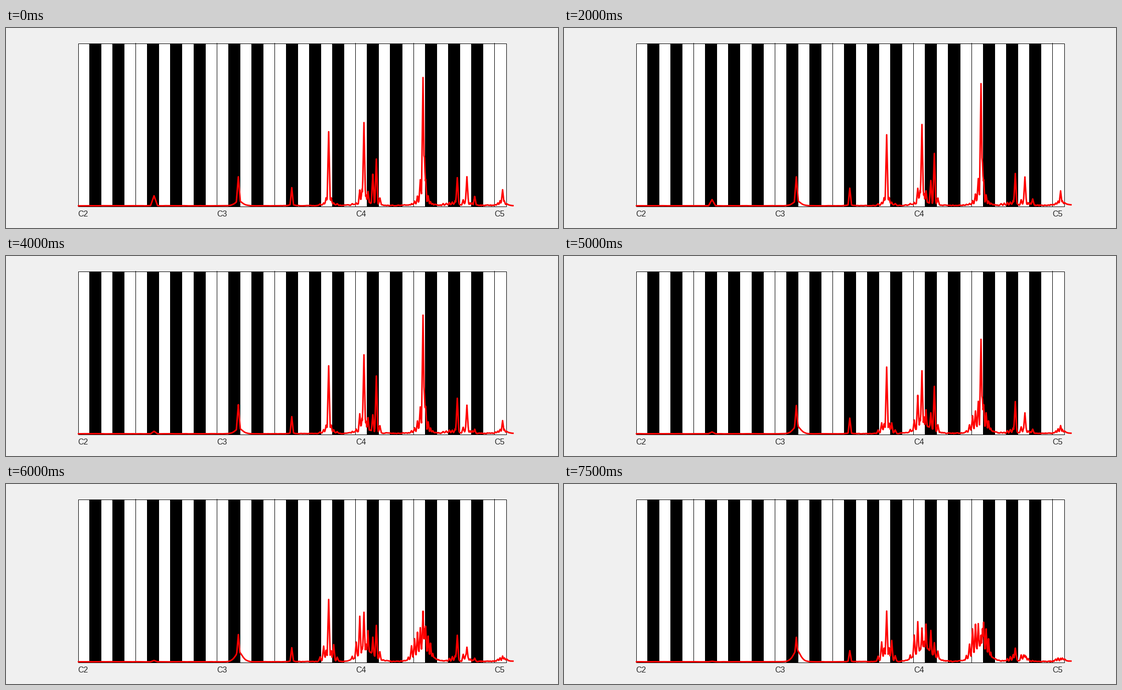
These frames come from a looping animation (1100 by 400 pixels, 8000 ms). A matplotlib script:

```python
import numpy as np
import matplotlib.pyplot as plt
from matplotlib.animation import FuncAnimation
from matplotlib.patches import Rectangle

W, H, DPI = 1100, 400, 100
PX = 72 / DPI                      # one pixel in points
LEFT, RIGHT, TOP, BOTTOM = 143, 996, 30, 356
KEYS = 37
KEY_W = (RIGHT - LEFT) / KEYS
OCTAVE = 12 * KEY_W
FRAMES, STEP = 16, 500

# Notes: x, then heights at these seconds
TIMES = [0, 4, 5.5, 7.5]
NOTES = [
    (295, 20, 5, 3, 1), (463, 58, 58, 56, 49), (569.5, 36, 34, 30, 22),
    (643, 148, 135, 132, 101), (705, 30, 40, 94, 80),
    (713.3, 166, 158, 109, 67), (731, 63, 38, 44, 62),
    (738, 92, 115, 84, 38), (834, 95, 75, 65, 65),
    (899.3, 56, 70, 61, 26), (918.5, 58, 56, 34, 12),
    (934, 18, 8, 8, 2), (989.6, 32, 25, 12, 7),
]
# The strongest note, one height per step
LEAD_X = 831
LEAD = [255, 270, 259, 243, 243, 251, 246, 237,
        237, 231, 188, 125, 100, 52, 55, 53]

# Sidebands: x, first height, last height
SIDES = [(690, 3, 13), (698, 5, 50), (709.5, 30, 28), (717.5, 22, 42),
         (721.3, 28, 74), (745, 14, 20)]
for gap, first, last in [(5, 16, 26), (10, 5, 42), (17, 3, 11)]:
    SIDES += [(643 - gap, first, last), (643 + gap, first, last)]


def comb(x, gap, shift, reach, first, fall, last):
    """Evenly tuned sidebands that spread from a steep to a flat profile."""
    for n in range(-6, 7):
        if n:
            yield (x + gap * n * (1 - 0.02 * n), first * fall ** abs(n),
                   last * np.exp(-(abs(n + shift) / reach) ** 4))


SIDES += comb(LEAD_X, 5.3, 0.35, 4, 125, 0.4, 75)
SIDES += comb(906, 5.2, 0, 4, 14, 0.8, 14)
SIDES += comb(989, 4.3, 0, 2.5, 18, 0.5, 7)

# Broad humps under the clusters: x, spread, first height, last height
HUMPS = [(464, 10, 10, 24), (643, 8, 10, 18), (718, 20, 6, 30),
         (LEAD_X, 19, 6, 32)]

centres = [p[0] for p in NOTES + SIDES] + [LEAD_X]
XS = np.unique(np.concatenate([np.arange(LEFT, RIGHT + 1), centres]))

# Frequency bins of the spectrum placed on the keyboard
freq = np.arange(46, 400) * 44100 / 32768
BINS = LEFT + KEY_W / 2 + OCTAVE * np.log2(freq / 65.41)


def peak(x, h):
    width = max(3.3, 7 * 2 ** ((295 - x) / OCTAVE))
    d = np.abs(XS - x)
    return h * np.maximum(1 - d / width, 0.1 * np.exp(-d / 4))


def spectrum(i):
    t = i * STEP / 1000
    rng = np.random.default_rng(40 + i)
    spread = np.interp(t, TIMES, [0, 0.08, 0.65, 1])
    parts = [peak(LEAD_X, LEAD[i])]
    for x, *heights in NOTES:
        parts.append(peak(x, np.interp(t, TIMES, heights)))
    for x, first, last in SIDES:
        h = first + (last - first) * spread
        parts.append(peak(x, h * rng.uniform(0.93, 1.07)))
    for x, size, first, last in HUMPS:
        h = first + (last - first) * spread
        parts.append(h * np.exp(-(np.abs(XS - x) / size) ** 1.6))
    level = 0.35 + 1.5 * np.clip((BINS - 540) / 150, 0, 1)
    noise = np.interp(XS, BINS, level * rng.random(len(BINS)))
    return BOTTOM - 0.3 - np.max(parts, axis=0) - noise


fig = plt.figure(figsize=(W / DPI, H / DPI), dpi=DPI, facecolor="#f0f0f0")
ax = fig.add_axes([0, 0, 1, 1])
ax.set_xlim(0, W)
ax.set_ylim(H, 0)
ax.axis("off")


def box(x, w, color):
    ax.add_patch(Rectangle((x, TOP + 0.5), w, BOTTOM - TOP, facecolor=color,
                           edgecolor="black", linewidth=PX))


box(LEFT + 0.5, RIGHT - LEFT, "white")
for k in range(KEYS):
    x = LEFT + k * KEY_W
    if k % 12 in (1, 3, 6, 8, 10):
        box(x, KEY_W, "black")
    elif k and k % 12 in (0, 5):
        ax.plot([x, x], [TOP, BOTTOM], color="black", lw=PX)

for n in range(4):
    ax.text(LEFT + OCTAVE * n + 10.8, 377, f"C{n + 2}",
            family="Liberation Sans", fontsize=16 * PX, color="#262626",
            ha="center", va="baseline")

curve, = ax.plot([], [], color="red", lw=3 * PX, solid_joinstyle="round",
                 solid_capstyle="butt", zorder=5)


def draw(i):
    curve.set_data(XS, spectrum(i))
    return curve,


anim = FuncAnimation(fig, draw, frames=FRAMES, interval=STEP,
                     init_func=lambda: draw(0), repeat=True, repeat_delay=0)
plt.show()
```
